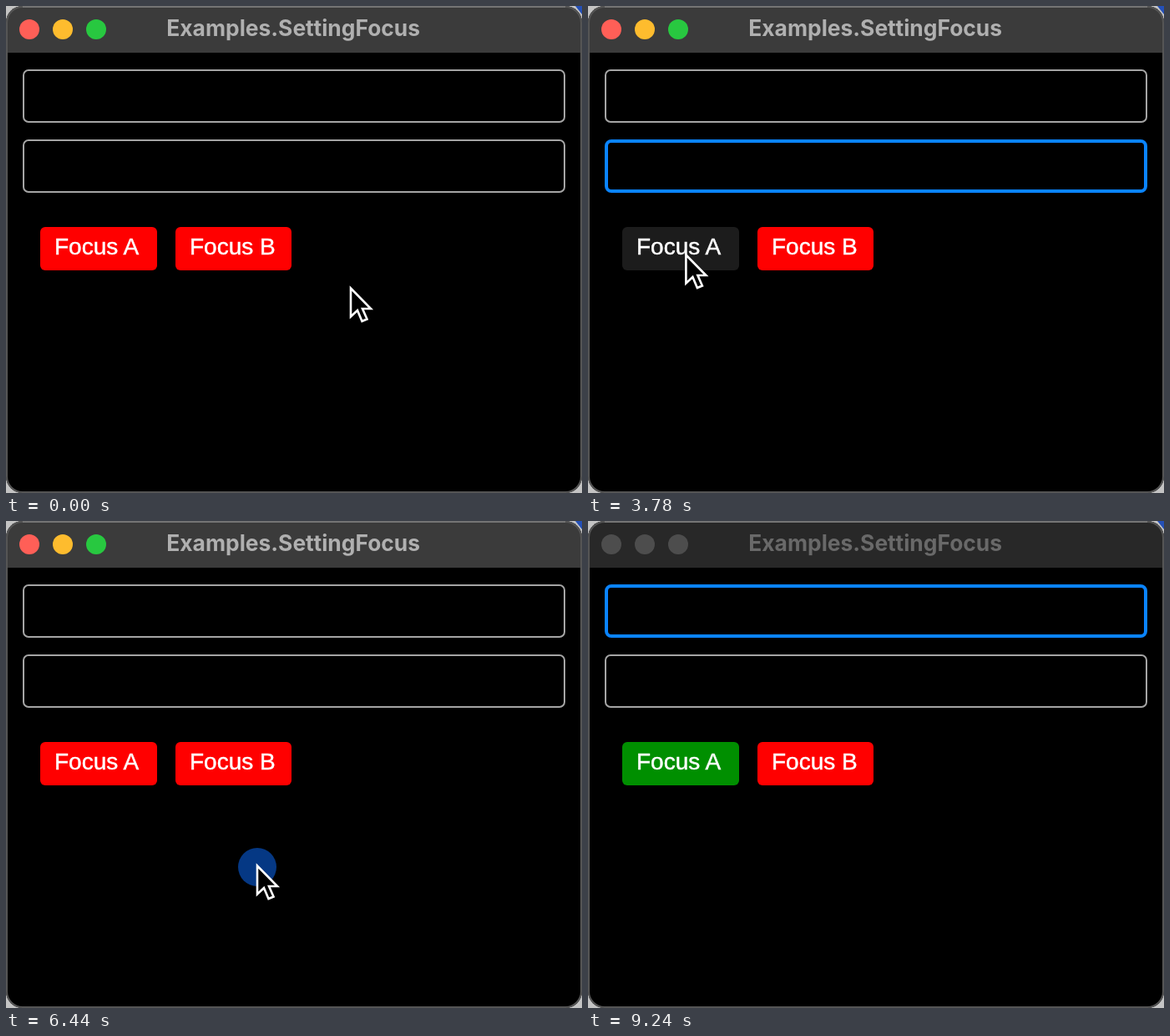
An HTML page that plays this animation: 690 by 584 pixels, repeating every 9310 ms.

```html
<!DOCTYPE html>
<html lang="en">
<head>
<meta charset="utf-8">
<title>Setting focus</title>
<style>
  html, body { margin: 0; height: 100%; overflow: hidden; background: #c4c4c4; }
  svg { display: block; width: 690px; height: 584px; }
  .title { font: 700 26.4px Inter, sans-serif; text-anchor: middle; fill: #b0b0b0; }
  .label { font: 28px "Liberation Sans", Arial, sans-serif; fill: #fff; stroke: #fff; stroke-width: .5; }
  .field { fill: none; stroke: #a5a5a5; stroke-width: 2; }
  .field.focused { stroke: #0a84ff; stroke-width: 4; }
  .bar { fill: #3b3b3b; }
  .inactive .bar { fill: #282828; }
  .inactive .title { fill: #696969; }
  .inactive .light { fill: #4d4d4d; }
  .beam { fill: none; stroke: #fff; stroke-width: 7; stroke-linecap: round; }
  .beam + .beam { stroke: #000; stroke-width: 2.6; }
</style>
</head>
<body>
<svg id="stage" viewBox="0 0 690 584">
  <path d="M682 0h8v10z" fill="#2450b8"/>
  <rect width="690" height="584" rx="20"/>
  <path class="bar" d="M0 56V20A20 20 0 0 1 20 0H670A20 20 0 0 1 690 20V56z"/>
  <rect x="1" y="1" width="688" height="582" rx="19" fill="none" stroke="#555" stroke-width="2"/>
  <path d="M20 1H670" stroke="#747474" stroke-width="2"/>
  <circle class="light" cx="28" cy="28" r="12" fill="#ff5f57"/>
  <circle class="light" cx="68" cy="28" r="12" fill="#febc2e"/>
  <circle class="light" cx="108" cy="28" r="12" fill="#28c840"/>
  <text class="title" x="344.2" y="36">Examples.SettingFocus</text>
  <rect class="field"/>
  <rect class="field"/>
  <rect id="caret" x="42" width="2" height="26" fill="#fff"/>
  <rect class="button" x="41" y="265" width="140" height="52" rx="6"/>
  <rect class="button" x="203" y="265" width="139" height="52" rx="6"/>
  <text class="label" x="58" y="298">Focus A</text>
  <text class="label" x="220" y="298">Focus B</text>
  <g id="pointer">
    <circle id="ring" fill="#0a66f0"/>
    <path id="arrow" d="M1 3.5V37.5L9 30L14.5 43L20.5 40.5L15 28H25z" stroke="#fff" stroke-width="2.6"/>
    <g id="ibeam">
      <path class="beam" d="M-7-18Q0-18 0-11Q0-18 7-18M0-11V11M-7 18Q0 18 0 11Q0 18 7 18M-3 2H3"/>
      <path class="beam" d="M-7-18Q0-18 0-11Q0-18 7-18M0-11V11M-7 18Q0 18 0 11Q0 18 7 18M-3 2H3"/>
    </g>
  </g>
</svg>
<script>
const LOOP = 9310, STEP = 70, BLINK = 530;
const SETTLE = 140, LINGER = 350, RELEASE = 100, RING = 490;
const $ = id => document.getElementById(id);
const all = selector => [...document.querySelectorAll(selector)];
const fields = all('.field'), buttons = all('.button');

// Pointer stops; those with a focus value are clicks (-1 clears the focus)
const stops = [
  { at: -280, x: 412, y: 335 },
  { at: 980, x: 122, y: 345 },
  { at: 1820, x: 427, y: 96, focus: 0 },
  { at: 2940, x: 420, y: 182, focus: 1 },
  { at: 4200, x: 111, y: 297, focus: 0 },
  { at: 5460, x: 248, y: 298, focus: 1 },
  { at: 6300, x: 300, y: 410, focus: -1 },
  { at: 7140, x: 148, y: 306, focus: 0 },
  { at: 8610, x: 430, y: -60 }
];
const clicks = stops.filter(stop => 'focus' in stop);
const clamp = u => Math.max(0, Math.min(1, u));
const inField = y => y > 76 && y < 140 || y > 160 && y < 224;
// Fields react to the press, everything else to the release
const focusTime = click => click.at + (inField(click.y) ? 0 : RELEASE);

function pointerAt(t) {
  let { x, y } = stops[0];
  stops.slice(1).forEach((stop, i) => {
    const leave = stops[i].at + LINGER, arrive = stop.at - SETTLE;
    const eased = 1 - (1 - clamp((t - leave) / (arrive - leave))) ** 4;
    x += (stop.x - x) * eased;
    y += (stop.y - y) * eased;
  });
  return { x, y };
}

function set(element, attributes) {
  for (const name in attributes) element.setAttribute(name, attributes[name]);
}

function draw(t) {
  const { x, y } = pointerAt(t);
  const age = t - (clicks.findLast(click => click.at <= t)?.at ?? -LOOP);
  const active = clicks.findLast(click => focusTime(click) <= t);
  const focus = active?.focus ?? -1;

  $('stage').classList.toggle('inactive', t >= LOOP - STEP);

  fields.forEach((field, i) => {
    const inset = focus === i ? 2 : 1;
    field.classList.toggle('focused', focus === i);
    set(field, { x: 20 + inset, y: 76 + 84 * i + inset, width: 650 - 2 * inset, height: 64 - 2 * inset, rx: 6 });
  });

  const caretOn = focus >= 0 && Math.floor((t - focusTime(active)) / BLINK) % 2 === 0;
  set($('caret'), { y: 91 + 84 * focus, opacity: +caretOn });

  buttons.forEach((button, i) => {
    const left = 41 + 162 * i;
    const hover = x > left && x < left + 140 && y > 265 && y < 317;
    const idle = i === 0 && focus >= 0 ? '#008f00' : '#f00';
    set(button, { fill: hover ? (age < RELEASE ? '#737373' : '#1c1c1c') : idle });
  });

  const typing = inField(y) && x > 20 && x < 670;
  set($('pointer'), { transform: `translate(${x} ${y})` });
  set($('arrow'), { opacity: +!typing });
  set($('ibeam'), { opacity: +typing });
  set($('ring'), {
    cx: 1,
    cy: typing ? -3 : 5,
    r: Math.min(29, 11 + age * 6 / 70),
    opacity: .55 * Math.min(age / SETTLE, Math.sqrt(clamp((RING - age) / LINGER)))
  });
}

const began = performance.now();
function tick() {
  const t = (performance.now() - began) % LOOP;
  draw(Math.floor(t / STEP) * STEP);
  requestAnimationFrame(tick);
}
tick();
</script>
</body>
</html>
```
